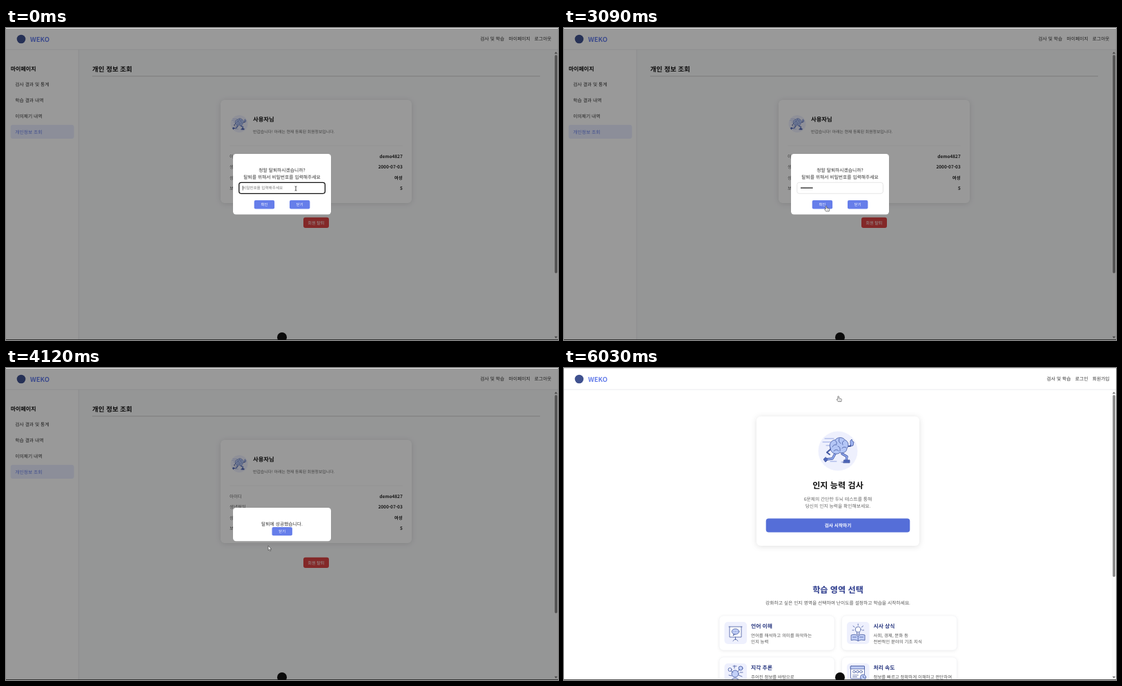
Animation of 800 by 451 pixels, one loop 6060 ms. Source, as an HTML page:

```html
<!DOCTYPE html>
<html lang="ko">
<head>
<meta charset="utf-8">
<title>회원 탈퇴</title>
<style>
  html, body { margin: 0; width: 100%; height: 100%; overflow: hidden; background: #fff; }
  svg { display: block; width: 800px; height: 451px; }
  text { font: 6.78px "Noto Sans CJK KR", "Noto Sans", sans-serif; fill: #333; text-rendering: geometricPrecision; white-space: pre; }
  .bold { font-weight: 700; fill: #111; }
  .mid { text-anchor: middle; }
  .end { text-anchor: end; }
  .label { font-size: 6.44px; fill: #666; }
  .value { font-size: 6.44px; font-weight: 700; fill: #222; text-anchor: end; }
  .small { font-size: 5.3px; fill: #fff; text-anchor: middle; }
  .section { font-size: 12.1px; font-weight: 700; text-anchor: middle; }
  .topic { font-size: 7.8px; font-weight: 700; fill: #27367f; }
  .desc { font-size: 6.43px; fill: #555; }
  .card { fill: #fff; filter: drop-shadow(0 1.5px 4px rgba(0, 0, 0, .12)); }
  .tile { fill: #fff; stroke: #eceef2; stroke-width: .5; filter: drop-shadow(0 1px 2px rgba(0, 0, 0, .07)); }
  .blue { fill: #667eea; }
  .soft { fill: #eef0fd; }
  .ink { fill: none; stroke: #42579f; stroke-width: .8; stroke-linecap: round; stroke-linejoin: round; }
  .pale { fill: #c3d0f7; }
</style>
</head>
<body>
<svg viewBox="0 0 800 451">
  <defs>
    <g id="runner" class="ink" stroke-width="1">
      <path d="M-20-17h13M-23-12h12M-18-7h8M-12 16h9M4 17h11" stroke="#7e93db"/>
      <path d="M-5 5-9 12-18 13" stroke="#42579f" stroke-width="3.4"/>
      <path d="M-5 5-9 12-17 13" stroke="#8fa6ec" stroke-width="2"/>
      <path d="M5 5 12 9 11 15" stroke="#42579f" stroke-width="3.4"/>
      <path d="M5 5 12 9 11 14" stroke="#8fa6ec" stroke-width="2"/>
      <path d="M-19 10l-3 3 3 4 3-3zM8 14l8 0 0 4-9 0z" fill="#4e66b8"/>
      <path d="M-10-3-17 3-13 6M12-6l5 0 2-5" stroke-width="2"/>
      <path d="M17-10l0-4 2-2 1 3 2 1-1 5-3 1z" fill="#9fb4f2"/>
      <path d="M-12-3C-15-9-10-15-5-15-1-20 7-19 9-15 15-13 15-5 12-3 12 3 5 5 2 3-3 8-12 4-12-3z" fill="#b4c6f6"/>
      <path d="M-9-5q2-4 6-3M-5-14q3 1 2 5M1-17q-2 5 2 7M8-14q-4 2-2 6M11-4q-4-2-6 1M-7 1q4-4 7 0M-1-6q4 1 3 7"/>
    </g>
    <g id="up"><path d="M794.8 37.3h4.4L797 34.3z" fill="#777"/></g>
    <g id="hand" fill="#fff" stroke="#333" stroke-width=".6" stroke-linejoin="round">
      <path d="M-.8.7Q0-.4.8.7V3.3l3.2.7q.8.3.7 1.2L4.2 8H-.3L-2.4 5.1q0-1 1.6-.2z"/>
      <path d="M1.1 5.2V6.6M2.5 5.2V6.6" fill="none" stroke-width=".4"/>
    </g>
    <path id="arrow" d="M0 0V6.6L1.5 5.3 2.6 7.8 3.7 7.3 2.6 4.9H4.6z" fill="#fff" stroke="#333" stroke-width=".6"/>
    <path id="beam" d="M-1.4-3.2Q0-3.2 0-2.4 0-3.2 1.4-3.2M0-2.4V2.4M-1.4 3.2Q0 3.2 0 2.4 0 3.2 1.4 3.2" fill="none" stroke="#222" stroke-width=".8"/>
  </defs>

  <rect width="800" height="451" fill="#fff"/>

  <g id="account">
    <rect x="105" y="31" width="695" height="420" fill="#f8f9fa"/>
    <path d="M105.3 31V451" stroke="#e3e5e8" stroke-width=".7"/>
    <text class="bold" x="6.7" y="62" style="font-size:8px">마이페이지</text>
    <rect x="6.7" y="140" width="91.8" height="20" rx="3" fill="#e8ecfe"/>
    <text x="13.3" y="83.7">검사 결과 및 통계</text>
    <text x="13.3" y="106.7">학습 결과 내역</text>
    <text x="13.3" y="129.7">이의제기 내역</text>
    <text x="13.3" y="152.7" style="fill:#667eea">개인정보 조회</text>
    <text class="bold" x="125" y="63.4" style="font-size:9.5px">개인 정보 조회</text>
    <path d="M125 69.7H774" stroke="#ccc" stroke-width=".9"/>

    <rect class="card" x="311" y="104" width="277" height="149" rx="6"/>
    <circle class="soft" cx="338" cy="138.5" r="12.5"/>
    <use href="#runner" transform="translate(338 139) scale(.45)"/>
    <text class="bold" x="358" y="135" style="font-size:8.3px">사용자님</text>
    <text x="358" y="152.4" style="font-size:5.88px;fill:#666">반갑습니다! 아래는 현재 등록된 회원정보입니다.</text>
    <path d="M324 170H575" stroke="#eee" stroke-width=".6"/>
    <text class="label" x="324" y="187.6">아이디</text><text class="value" x="574.7" y="187.6">demo4827</text>
    <text class="label" x="324" y="203.2">생년월일</text><text class="value" x="574.7" y="203.2">2000-07-03</text>
    <text class="label" x="324" y="218.8">성별</text><text class="value" x="574.7" y="218.8">여성</text>
    <text class="label" x="324" y="234.4">보유 포인트</text><text class="value" x="574.7" y="234.4">5</text>
    <rect x="431" y="273.7" width="37" height="15.3" rx="3" fill="#d94343"/>
    <text class="small" x="449.5" y="283.6" style="font-size:6px">회원 탈퇴</text>
    <text x="687.3" y="18.4">검사 및 학습</text>
    <text x="728.5" y="18.4">마이페이지</text>
    <text class="end" x="790.6" y="18.4">로그아웃</text>
  </g>

  <g id="home">
    <text x="699.6" y="18.4">검사 및 학습</text>
    <text x="740.8" y="18.4">로그인</text>
    <text class="end" x="790.6" y="18.4">회원가입</text>
    <rect class="card" x="279" y="70" width="236" height="187" rx="6"/>
    <circle class="soft" cx="397" cy="120" r="28.5"/>
    <use href="#runner" transform="translate(398 119)"/>
    <text class="section" x="397" y="173.8" style="fill:#111">인지 능력 검사</text>
    <text class="mid" x="397" y="191.6" style="fill:#666">6문제의 간단한 두뇌 테스트를 통해</text>
    <text class="mid" x="397" y="201.8" style="fill:#666">당신의 인지 능력을 확인해보세요.</text>
    <rect id="start" class="blue" x="292.7" y="217.5" width="208.6" height="20" rx="4"/>
    <text class="bold mid" x="397" y="230.1" style="font-size:6.65px;fill:#fff">검사 시작하기</text>
    <text class="section" x="397" y="324.6" style="fill:#2b3a8c">학습 영역 선택</text>
    <text class="mid" x="397" y="342.4" style="fill:#555">강화하고 싶은 인지 영역을 선택하여 난이도를 설정하고 학습을 시작하세요.</text>

    <g transform="translate(225 358)">
      <rect class="tile" width="167" height="50" rx="6"/>
      <rect class="soft" x="7.5" y="9" width="32.5" height="32" rx="5"/>
      <g class="ink">
        <path d="M14 16H33M15 16V31H32V16M23.5 31V35M20 36.5 23.5 33.5 27 36.5" fill="#fff"/>
        <ellipse class="pale" cx="23.5" cy="23" rx="5.3" ry="4"/><path d="M21 26.5l-1 2.5 3-2M21 23h.1M23.5 23h.1M26 23h.1"/>
      </g>
      <text class="topic" x="46" y="17.8">언어 이해</text>
      <text class="desc" x="46" y="30.8">언어를 해석하고 의미를 파악하는</text>
      <text class="desc" x="46" y="39.9">인지 능력</text>
    </g>
    <g transform="translate(402.5 358)">
      <rect class="tile" width="167" height="50" rx="6"/>
      <rect class="soft" x="7.5" y="9" width="32.5" height="32" rx="5"/>
      <g class="ink">
        <path class="pale" d="M14 28q6-2 9.700 1.500Q27 26 33.500 28V35.500q-6-1.500-9.800 1Q20 34 14 35.500z"/>
        <path d="M23.700 29.500V36.500M16 31h5M26 31h5"/>
        <circle cx="23.700" cy="20" r="4" fill="#fff"/><path d="M22 24V27H25.500V24M23.700 12v2M16.500 15l2 1.500M31 15l-2 1.500M15.500 21h2M30 21h2"/>
      </g>
      <text class="topic" x="46" y="17.8">시사 상식</text>
      <text class="desc" x="46" y="30.8">사회, 경제, 문화 등</text>
      <text class="desc" x="46" y="39.9">전반적인 분야의 기초 지식</text>
    </g>
    <g transform="translate(225 418)">
      <rect class="tile" width="167" height="50" rx="6"/>
      <rect class="soft" x="7.5" y="9" width="32.5" height="32" rx="5"/>
      <g class="ink">
        <circle class="pale" cx="23" cy="24" r="5"/><circle cx="15.5" cy="18" r="2.500"/><circle class="pale" cx="31" cy="16" r="3"/>
        <path d="M17 20l3 2M27 21l2-3M20 13h5M22 12v4M14 26l4 1M28 26l5 2M17 33q6-6 12 0M30 22h4"/>
      </g>
      <text class="topic" x="46" y="17.8">지각 추론</text>
      <text class="desc" x="46" y="30.8">주어진 정보를 바탕으로</text>
    </g>
    <g transform="translate(402.5 418)">
      <rect class="tile" width="167" height="50" rx="6"/>
      <rect class="soft" x="7.5" y="9" width="32.5" height="32" rx="5"/>
      <g class="ink">
        <rect x="13" y="13" width="20" height="18" rx="1" fill="#fff"/><path class="pale" d="M13 13H33V17H13z"/>
        <circle cx="18" cy="21" r="1.800"/><circle cx="23" cy="21" r="1.800"/><circle cx="28" cy="21" r="1.800"/>
        <path d="M16 26h8M16 28.500h6"/><circle class="pale" cx="31" cy="29" r="4"/><path d="M31 27v2l2 1"/>
      </g>
      <text class="topic" x="46" y="17.8">처리 속도</text>
      <text class="desc" x="46" y="30.8">정보를 빠르고 정확하게 이해하고 판단하여</text>
    </g>
  </g>

  <circle cx="22" cy="16" r="6.300" fill="#3f518f"/>
  <text class="bold" x="35" y="19.800" style="font-size:9.500px;fill:#667eea">WEKO</text>
  <path d="M0 31.200H800" stroke="#e6e8eb" stroke-width=".8"/>
  <rect x="794" y="32" width="6" height="418" fill="#fafafa"/>
  <use href="#up"/>
  <use href="#up" transform="translate(0 483) scale(1 -1)"/>
  <rect id="thumb" x="795.300" y="39" width="3.600" rx="1.800" fill="#858585"/>
  <path d="M0 450.500H800" stroke="#555"/>
  <path d="M0 .5H800" stroke="#e2e2e2"/>
  <rect id="shade" y="1" width="800" height="450" fill="#000" opacity=".4"/>
  <circle cx="400" cy="447" r="7" fill="#0b0b0b"/>

  <g id="ask">
    <rect x="329" y="182" width="142" height="87.500" rx="4.200" fill="#fff"/>
    <text class="mid" x="400" y="207.700">정말 탈퇴하시겠습니까?</text>
    <text class="mid" x="400" y="217.700">탈퇴를 위해서 비밀번호를 입력해주세요</text>
    <rect id="field" x="337.700" y="223.300" width="124.700" height="16" rx="3.200" fill="#fff"/>
    <text id="hint" x="343" y="233.200" style="font-size:5.600px;fill:#777">비밀번호를 입력해주세요</text>
    <g id="dots" fill="#111"></g>
    <path id="caret" d="M0 228V234.700" stroke="#111" stroke-width=".6"/>
    <rect class="blue" x="359.700" y="249" width="29.400" height="12.500" rx="2"/>
    <text class="small" x="374.400" y="257.200">확인</text>
    <rect class="blue" x="411" y="249" width="29.400" height="12.500" rx="2"/>
    <text class="small" x="425.700" y="257.200">닫기</text>
  </g>

  <g id="done">
    <rect x="329" y="202" width="142" height="48.300" rx="4.200" fill="#fff"/>
    <text class="mid" x="400" y="227.700">탈퇴에 성공했습니다.</text>
    <rect class="blue" x="385.500" y="230" width="29.400" height="12.200" rx="2"/>
    <text class="small" x="400.200" y="238.100">닫기</text>
  </g>

  <use id="cursor" href="#beam"/>
</svg>
<script>
const LOOP = 6060;
const BLUR = 3000, CLOSE = 3120, SUCCESS = 3970, HOME = 5090;
const HOVER = 5800;
const KEYS = [250, 450, 700, 850, 1090, 1300, 1550, 1700, 1950];
const DOT_STEP = 1.95;
// time, x, y of the pointer tip
const PATH = [
  [0, 420, 232], [2150, 420, 232], [2800, 380, 257], [4100, 380, 257],
  [4700, 399, 235], [5060, 399, 235], [5090, 398.8, 236.3],
  [5750, 398.8, 236.3], [6030, 397.6, 40.5], [LOOP, 397.6, 40.5]
];

const $ = id => document.getElementById(id);
const show = (id, on) => $(id).style.display = on ? '' : 'none';
const ease = p => p * p * (3 - 2 * p);

const dots = KEYS.map((_, i) => {
  const dot = document.createElementNS('http://www.w3.org/2000/svg', 'circle');
  dot.setAttribute('cx', 343.95 + DOT_STEP * i);
  dot.setAttribute('cy', 231.2);
  dot.setAttribute('r', .85);
  return $('dots').appendChild(dot);
});

function pointer(t) {
  const i = PATH.findIndex(step => step[0] > t);
  const [t0, x0, y0] = PATH[i - 1], [t1, x1, y1] = PATH[i];
  const p = ease((t - t0) / (t1 - t0));
  return [x0 + (x1 - x0) * p, y0 + (y1 - y0) * p];
}

function pointerShape(t, x, y) {
  if (t < CLOSE) return y < 239.5 ? 'beam' : y < 249 ? 'arrow' : 'hand';
  if (t >= HOME) return 'hand';
  return t >= SUCCESS && x > 385.5 && y < 242 ? 'hand' : 'arrow';
}

function render(t) {
  const asking = t < CLOSE, done = t >= SUCCESS && t < HOME, home = t >= HOME;
  show('account', !home);
  show('home', home);
  show('ask', asking);
  show('done', done);
  show('shade', asking || done);
  $('thumb').setAttribute('height', home ? 263 : 315.5);

  const typed = KEYS.filter(k => k <= t).length;
  const focused = t < BLUR;
  dots.forEach((dot, i) => dot.style.display = i < typed ? '' : 'none');
  show('hint', !typed);
  const sinceKey = t - (KEYS[typed - 1] || 0);
  show('caret', focused && sinceKey % 1000 < 500);
  $('caret').setAttribute('transform', `translate(${343.2 + DOT_STEP * typed} 0)`);
  $('field').setAttribute('stroke', focused ? '#111' : '#d5d5d5');
  $('field').setAttribute('stroke-width', focused ? 1.3 : .6);

  $('start').style.fill = t < HOVER ? '#667eea' : '#556ed8';

  const [x, y] = pointer(t);
  $('cursor').setAttribute('href', '#' + pointerShape(t, x, y));
  $('cursor').setAttribute('transform', `translate(${x} ${y})`);
}

const begin = performance.now();
function tick() {
  render((performance.now() - begin) % LOOP);
  requestAnimationFrame(tick);
}
tick();
</script>
</body>
</html>
```
